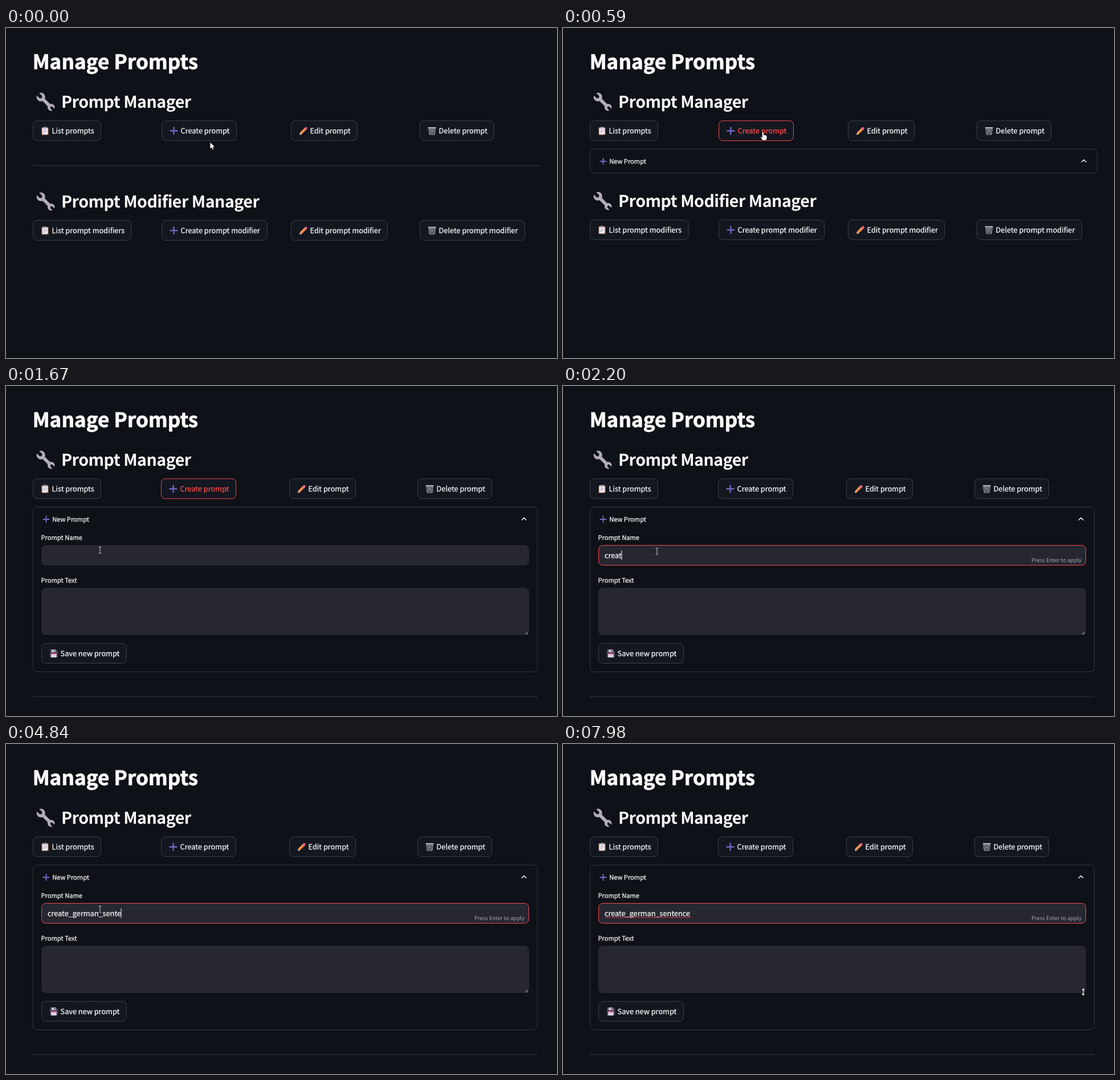
Recreate the animation shown at these times as an HTML page. Size 967x579 px, loop 8000 ms.

```html
<!DOCTYPE html>
<html lang="en">
<head>
<meta charset="utf-8">
<title>Manage Prompts</title>
<style>
  html, body { margin: 0; width: 100%; height: 100%; overflow: hidden; background: #0e1117; }
  svg { display: block; width: 100vw; height: 100vh; }
  text {
    font: 400 12.72px "Noto Sans CJK JP", "Noto Sans CJK SC", "Noto Sans CJK", "Noto Sans", sans-serif;
    color: #fafafa; fill: currentColor; stroke: currentColor; stroke-width: .25;
    text-rendering: geometricPrecision; white-space: pre;
  }
  .title { font-size: 34.96px; font-weight: 700; letter-spacing: .0035em; stroke-width: .8; }
  .head { font-size: 28.6px; font-weight: 700; letter-spacing: -.018em; stroke: none; }
  .label { font-size: 11.13px; }
  .hint { font-size: 9.53px; color: #a5a6ab; text-anchor: end; stroke: none; }
  .box { fill: #131720; stroke: #3b3e46; }
  .panel { fill: none; stroke: #33363e; }
  .field { fill: #262730; stroke: #262730; }
  .focus { stroke: #f04a4c; }
  .hot .box { stroke: #f04a4c; }
  .hot text { color: #ff4b4b; }
  .rule { stroke: #35383f; }
  .line { fill: none; stroke-linecap: round; stroke-linejoin: round; }
</style>
</head>
<body>
<svg viewBox="0 0 967 579" preserveAspectRatio="none">
  <defs>
    <g id="wrench">
      <path d="M9 9 26 26" stroke="#b4acbc" stroke-width="5.8"/>
      <circle cx="8.2" cy="8.2" r="7.6" fill="#b4acbc"/>
      <circle cx="26.2" cy="26.2" r="6.2" fill="#b4acbc"/>
      <path d="M-1 -1 7.4 7.4" stroke="#0e1117" stroke-width="6" stroke-linecap="round"/>
      <path d="M27 27 34 34" stroke="#0e1117" stroke-width="4.6" stroke-linecap="round"/>
    </g>
    <g id="list">
      <rect x="1" y="1.2" width="12" height="13.6" rx="1.2" fill="#a56a42"/>
      <path d="M2 2.4h10v8.8l-2.5 2.6H2z" fill="#f3eef8"/>
      <path d="M3.5 6h7M3.5 8.2h7M3.5 10.4h4.5" stroke="#a9a2b5" stroke-width=".9"/>
      <path d="M12 11.2v2.6H9.5z" fill="#c5bccd"/>
      <rect x="4" y=".4" width="6" height="3" rx="1" fill="#a59cb0"/>
    </g>
    <g id="plus">
      <path d="M7 1.5v12M1 7.5h12" stroke="#7467c5" stroke-width="2.3" stroke-linecap="round"/>
    </g>
    <g id="edit">
      <path d="M3.2 11.8 11.2 3.8" stroke="#f08038" stroke-width="4.4"/>
      <path d="M2.5 11 10.2 3.2" stroke="#ffa45c" stroke-width="1.5"/>
      <path d="M10 5 11.6 3.4" stroke="#b9aebf" stroke-width="4.4"/>
      <path d="M11.4 3.6 12 3" stroke="#ef5f7c" stroke-width="4.4" stroke-linecap="round"/>
      <path d="M1.6 10.2 4.8 13.4.2 15z" fill="#f3c79c"/>
      <path d="M.8 12.8 2.2 14.3 0 15z" fill="#433b52"/>
    </g>
    <g id="delete">
      <path d="M1.2 2.5h12L11.6 14H2.8z" fill="#45454d" stroke="#a7a5ad" stroke-width=".9"/>
      <path d="M3 3 11 14M6 3l5.5 8M10 3l2 3M11.5 3 3.2 14M8.2 3 2.6 11M4.5 3 2 6.5" stroke="#a7a5ad" stroke-width=".8"/>
      <path d="M.8 1.7h12.8" stroke="#c5c3ca" stroke-width="1.4" stroke-linecap="round"/>
    </g>
    <g id="save">
      <path d="M1 1h10.5L14 3.5V14H1z" fill="#4d4763" stroke="#4d4763" stroke-linejoin="round"/>
      <rect x="3.7" y=".6" width="7" height="4.6" fill="#cfc8d8"/>
      <rect x="8" y="1.2" width="1.6" height="3.2" fill="#4d4763"/>
      <rect x="2.8" y="7.4" width="9.2" height="7" fill="#f1edf6"/>
      <rect x="2.8" y="7.2" width="9.2" height="1.8" fill="#e0526f"/>
      <path d="M4 10.8h7M4 12.8h7" stroke="#aaa3b6" stroke-width=".8"/>
    </g>
  </defs>

  <text class="title" x="46.7" y="72">Manage Prompts</text>
  <use href="#wrench" x="53" y="113"/>
  <text class="head" x="97" y="140.3">Prompt Manager</text>
  <g id="promptButtons"></g>

  <g id="modifiers">
    <use href="#wrench" x="53" y="288"/>
    <text class="head" x="97" y="315.3">Prompt Modifier Manager</text>
    <g id="modifierButtons"></g>
  </g>

  <path id="rule" class="rule"/>

  <g id="panel">
    <rect id="frame" class="panel" x="47.5" y="212.5" rx="7"/>
    <use href="#plus" transform="translate(64.5 227.5) scale(.86)"/>
    <text class="label" x="81.2" y="238">New Prompt</text>
    <path id="chevron" class="line" d="M-3.8 2 0-1.8 3.8 2" stroke="#fafafa" stroke-width="1.5"/>
  </g>

  <g id="form">
    <text class="label" x="61.5" y="269.6">Prompt Name</text>
    <rect id="nameField" class="field" x="62.5" y="279.5" height="35" rx="7"/>
    <text class="label" x="61.5" y="344.6">Prompt Text</text>
    <rect id="textField" class="field" x="62.5" y="354.5" height="82" rx="7"/>
    <path id="grip" d="M-5-.5 0-5.5M-2-.5 0-2.5" stroke="#c8c8cc" stroke-width=".9"/>
    <g id="saveButton"></g>
    <text id="typed" x="73" y="302.2"></text>
    <path id="squiggle" class="line" stroke="#e8383d"/>
    <rect id="caret" y="288.5" width="1" height="17" fill="#fafafa"/>
    <text id="hint" class="hint" x="910" y="308.8">Press Enter to apply</text>
  </g>

  <g id="cursor">
    <path id="arrow" d="M0 0V12.6L2.9 9.9 4.9 14.2 7 13.2 5.1 9.1H9z" fill="#fff" stroke="#000" stroke-width=".8"/>
    <path id="hand" d="M-1.5 1Q0-1 1.4 1V5.5L3.4 5.6 5.2 6.1 7 7V11.5L5.4 15.3H-.8L-4.4 9.6Q-4.2 8-2.6 8.8L-1.5 10z" fill="#fff" stroke="#000" stroke-width=".8"/>
    <path id="beam" d="M-2.5-5.5H-.6L0-5 .6-5.5H2.5M0-5V5M-2.5 5.5H-.6L0 5 .6 5.5H2.5" fill="none" stroke="#c9c9cd"/>
    <path id="resize" d="M0-7 3.4-3H1V3H3.4L0 7-3.4 3H-1V-3H-3.4z" fill="#fff" stroke="#000" stroke-width=".8"/>
  </g>
</svg>

<script>
const LOOP = 8000, TICK = 67;
const PHRASE = "create_german_sentence";
const OPENED = 590, FORM = 660, SETTLED = 720, FOCUSED = 1730;
const WIDE = 226.3, NARROW = 225, ROW_Y = 162.7;

// time, number of letters
const typing = [
  [1800, 1], [1870, 3], [2070, 4], [2200, 5], [2330, 6], [2800, 7], [3060, 8], [3200, 9],
  [3340, 10], [3450, 11], [3550, 12], [3650, 13], [4050, 14], [4180, 15], [4380, 16],
  [4450, 17], [4640, 18], [4770, 19], [4870, 20], [4970, 21], [6440, 22]
];

// time, x, y of the pointer's hot spot
const route = [
  [0, 358, 200], [60, 358, 199], [330, 351, 182], [1190, 351, 182], [1320, 322, 199],
  [1470, 232, 251], [1600, 176, 283], [1670, 165, 288], [1730, 165, 290], [7030, 165, 290],
  [7170, 285, 306], [7370, 610, 390], [7570, 890, 468], [7640, 925, 477], [7740, 920, 446],
  [7840, 915, 437], [7980, 913, 434.5]
];

const $ = id => document.getElementById(id);
const show = (id, on) => $(id).style.display = on ? "" : "none";
const set = (id, name, value) => $(id).setAttribute(name, value);

const button = (icon, label, x, y, width) => `
  <g transform="translate(${x} ${y})">
    <rect class="box" width="${width}" height="35" rx="7"/>
    <use href="#${icon}" x="14" y="10.3"/>
    <text x="33.1" y="22.7">${label}</text>
  </g>`;

const icons = ["list", "plus", "edit", "delete"];
const verbs = ["List", "Create", "Edit", "Delete"];
const columns = pitch => icons.map((_, i) => Math.round(i * pitch) + 47.5);

function buttonRow(id, noun, widths, y) {
  const xs = columns(WIDE);
  $(id).innerHTML = icons.map((icon, i) =>
    button(icon, `${verbs[i]} ${noun}${i ? "" : "s"}`, xs[i], y, widths[i])).join("");
}

buttonRow("promptButtons", "prompt", [119, 131, 116, 130], ROW_Y);
buttonRow("modifierButtons", "prompt modifier", [172.5, 185, 169, 184], 337.5);
$("saveButton").innerHTML = button("save", "Save new prompt", 62.5, 451.5, 149);

let wave = "M74 305";
for (let x = 76; x <= 224; x += 2) wave += `L${x} ${x % 4 ? 305 : 303.4}`;
set("squiggle", "d", wave);

function pointerAt(t) {
  const next = route.findIndex(p => p[0] > t);
  if (next < 0) return route.at(-1).slice(1);
  const [t0, x0, y0] = route[next - 1], [t1, x1, y1] = route[next];
  const k = (t - t0) / (t1 - t0);
  return [x0 + (x1 - x0) * k, y0 + (y1 - y0) * k];
}

function pointerShape(t, x, y) {
  if (t >= 7740) return "resize";
  if (t < 1400 && y < 198 && x > 273 && x < 404) return "hand";
  const inField = x > 62 && x < 918 && (y > 279 && y < 315 || y > 354 && y < 437);
  return t > FORM && inField ? "beam" : "arrow";
}

function layout(t) {
  const form = t >= FORM, right = form ? 932.5 : 937.5;
  const xs = columns(form ? NARROW : WIDE);
  [...$("promptButtons").children].forEach((b, i) => {
    b.setAttribute("transform", `translate(${xs[i]} ${ROW_Y})`);
    b.classList.toggle("hot", i === 1 && t >= 100 && t < FOCUSED);
  });
  show("modifiers", !form);
  set("modifiers", "transform", `translate(0 ${t >= OPENED ? -1 : 0})`);
  show("rule", form || t < OPENED);
  set("rule", "d", `M47 ${form ? 545 : 241.5}H${right + .5}`);
  show("panel", t >= OPENED);
  set("frame", "width", right - 47.5);
  set("frame", "height", form ? 289 : 42);
  set("chevron", "transform", `translate(${form ? 909 : 914} 233)`);
  show("form", form);
  const fieldRight = t < SETTLED ? 922.5 : 917.5;
  set("nameField", "width", fieldRight - 62.5);
  set("textField", "width", fieldRight - 62.5);
  set("grip", "transform", `translate(${fieldRight - 1.5} 436.5)`);
}

function editing(t) {
  const focused = t >= FOCUSED;
  const [since, count] = typing.findLast(k => k[0] <= t) || [FOCUSED, 0];
  $("nameField").classList.toggle("focus", focused);
  show("hint", focused);
  $("typed").textContent = PHRASE.slice(0, count);
  set("caret", "x", Math.round(73 + (count ? $("typed").getComputedTextLength() : 0)) - .5);
  show("caret", focused && t < 7980 && Math.floor((t - since) / 530) % 2 === 0);
  show("squiggle", t >= 6100 && t < 6440 || t >= 7040);
  set("squiggle", "stroke-dasharray", t < 6440 ? "165 999" : "none");
}

function pointer(t) {
  const held = t >= 7980 ? t : Math.floor((t + 16) / TICK) * TICK;
  const [x, y] = pointerAt(t >= 1660 && t < 1800 ? (t < FOCUSED ? 1670 : FOCUSED) : held);
  set("cursor", "transform", `translate(${Math.round(x)} ${Math.round(y)})`);
  const shape = pointerShape(t, x, y);
  for (const id of ["arrow", "hand", "beam", "resize"]) show(id, id === shape);
}

const start = performance.now();
function draw() {
  const t = (performance.now() - start) % LOOP;
  layout(t);
  editing(t);
  pointer(t);
  requestAnimationFrame(draw);
}
draw();
</script>
</body>
</html>
```
